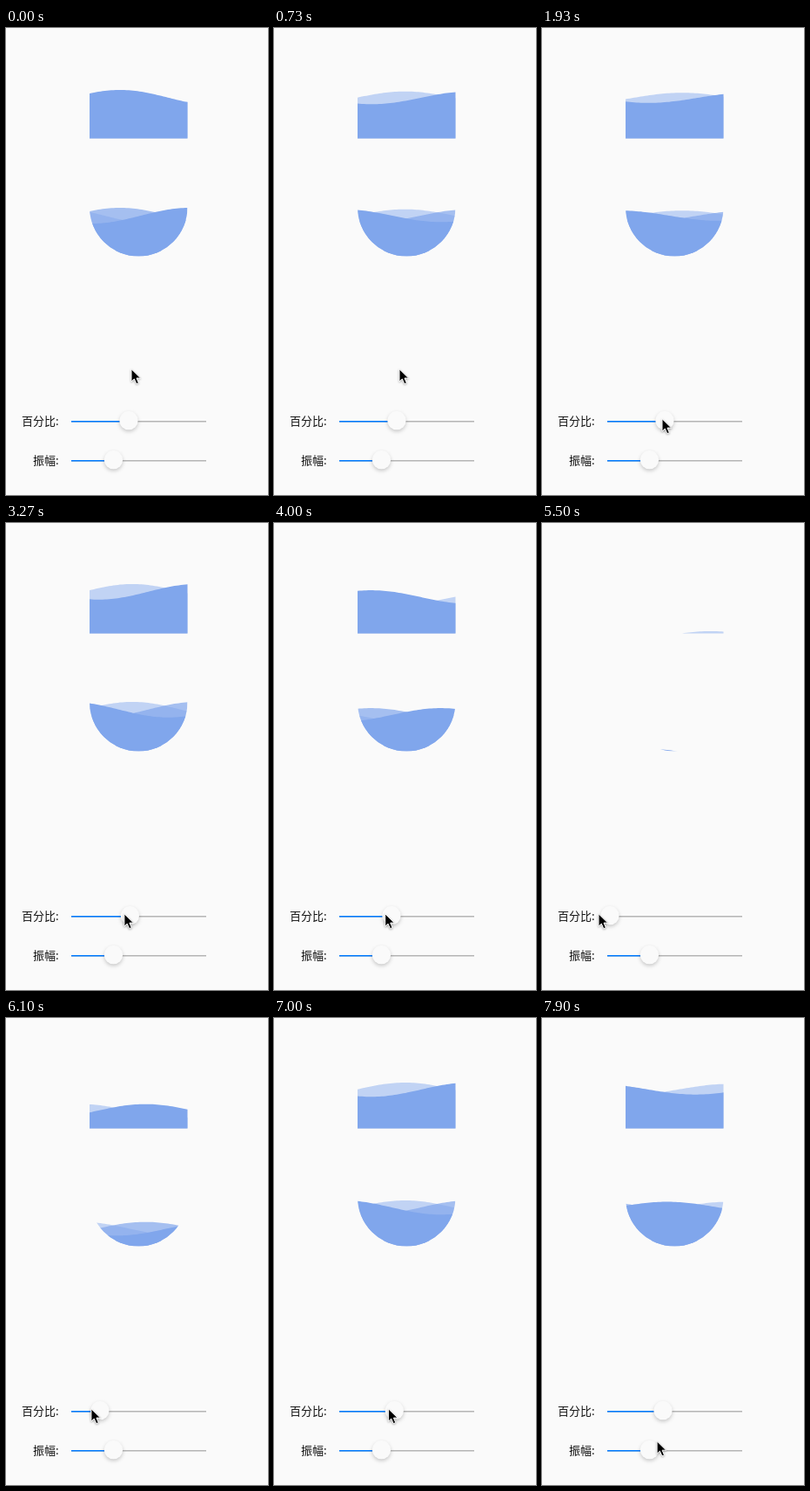
An HTML page for the animation above (8000 ms loop, 301 px wide and 535 px high).

```html
<!DOCTYPE html>
<html lang="zh">
<head>
<meta charset="utf-8">
<title>Wave progress</title>
<style>
  html, body { margin: 0; width: 100%; height: 100%; overflow: hidden; background: #fafafa; }
  svg { display: block; width: 100vw; height: 100vh; }
  text { font: 13px "Noto Sans CJK SC", "Noto Sans CJK", sans-serif; text-anchor: end; fill: #111; }
  .wave { fill: #80a6ec; }
  .back { opacity: .47; }
  .mid { opacity: .69; }
  .rail { stroke: #b5b5b5; stroke-width: 1.4; }
  .fill { stroke: #007aff; stroke-width: 1.5; }
  .thumb { fill: #fafafa; filter: drop-shadow(0 2px 2px rgba(0, 0, 0, .2)); }
  #cursor { filter: drop-shadow(0 1px 1px rgba(0, 0, 0, .3)); }
</style>
</head>
<body>
<svg viewBox="0 0 301 535">
  <clipPath id="bowl"><circle cx="152.25" cy="70.25" r="56.25"/></clipPath>
  <g>
    <path class="wave back" data-shift="-74"/>
    <path class="wave" data-shift="0"/>
  </g>
  <g transform="translate(0 135)">
    <g clip-path="url(#bowl)">
      <path class="wave back" data-shift="-74"/>
      <path class="wave mid" data-shift="0"/>
      <path class="wave" data-shift="80"/>
    </g>
  </g>

  <text x="60.5" y="455">百分比:</text>
  <path class="rail" d="M75 450.7H230"/>
  <path class="fill" id="percent"/>
  <circle class="thumb" id="knob" cy="449.7" r="10.6"/>

  <text x="60.5" y="500">振幅:</text>
  <path class="rail" d="M75 495.7H230"/>
  <path class="fill" d="M75 495.7H123.5"/>
  <circle class="thumb" cx="123.5" cy="494.7" r="10.6"/>

  <path id="cursor" d="M0 0V14.4L3.3 11.4L5.8 17L8.4 15.9L6 10.4H10.6Z"
        fill="#000" stroke="#fff" stroke-linejoin="round"/>
</svg>
<script>
const LOOP = 8000, STEP = 148.8, LEAD = 15;
const LEFT = 96, RIGHT = 208.5, BOTTOM = 126.5, LENGTH = 225;
const SPEED = .18; // px per ms, to the left

// The drag of the upper slider: [time in ms, thumb x].
const drag = [[0, 141], [2400, 141], [3600, 143], [4750, 107], [5250, 78], [5750, 78], [6100, 109], [7000, 139], [LOOP, 139]];

const $ = id => document.getElementById(id);
const waves = document.querySelectorAll('.wave');
const ramp = (t, from, to) => Math.min(1, Math.max(0, (t - from) / (to - from)));

function thumbX(t) {
  const i = drag.findIndex(key => key[0] > t);
  const [t0, a] = drag[i - 1], [t1, b] = drag[i];
  return a + (b - a) * ramp(t, t0, t1);
}

// The wave height swings linearly between 9 and 5.2.
function amplitude(t) {
  const p = t % 3300 / 1650;
  return 9 - 3.8 * Math.min(p, 2 - p);
}

function wavePath(crest, level, amp) {
  let d = `M${LEFT} ${BOTTOM}`;
  for (let x = LEFT; x <= RIGHT; x += 2.5) {
    const y = level - amp * Math.cos((x - crest) * 2 * Math.PI / LENGTH);
    d += `L${x} ${Math.min(y, BOTTOM).toFixed(2)}`;
  }
  return d + `L${RIGHT} ${BOTTOM}Z`;
}

function draw(now) {
  // The picture advances in even steps.
  const step = Math.floor((now % LOOP + LEAD) / STEP);
  const t = Math.max(0, step * STEP - LEAD + 2);
  const x = thumbX(t), level = 80 + .8 * (141 - x);
  const crest = 131 - SPEED * t, amp = amplitude(t);
  for (const w of waves) w.setAttribute('d', wavePath(crest + +w.dataset.shift, level, amp));

  $('percent').setAttribute('d', `M75 450.7H${x}`);
  $('knob').setAttribute('cx', x);

  // The pointer comes down to the thumb, follows it, then leaves for the lower slider.
  const px = 136.5 + 1.1 * (x - 143) + 9.7 * (1 - ramp(t, 900, 2550));
  const py = 390.7 + 57 * ramp(t, 880, 1400) + 38.5 * ramp(t, 7700, 7880);
  $('cursor').setAttribute('transform', `translate(${px} ${py})`);
}

const start = performance.now();
function tick() {
  draw(performance.now() - start);
  requestAnimationFrame(tick);
}
tick();
</script>
</body>
</html>
```
